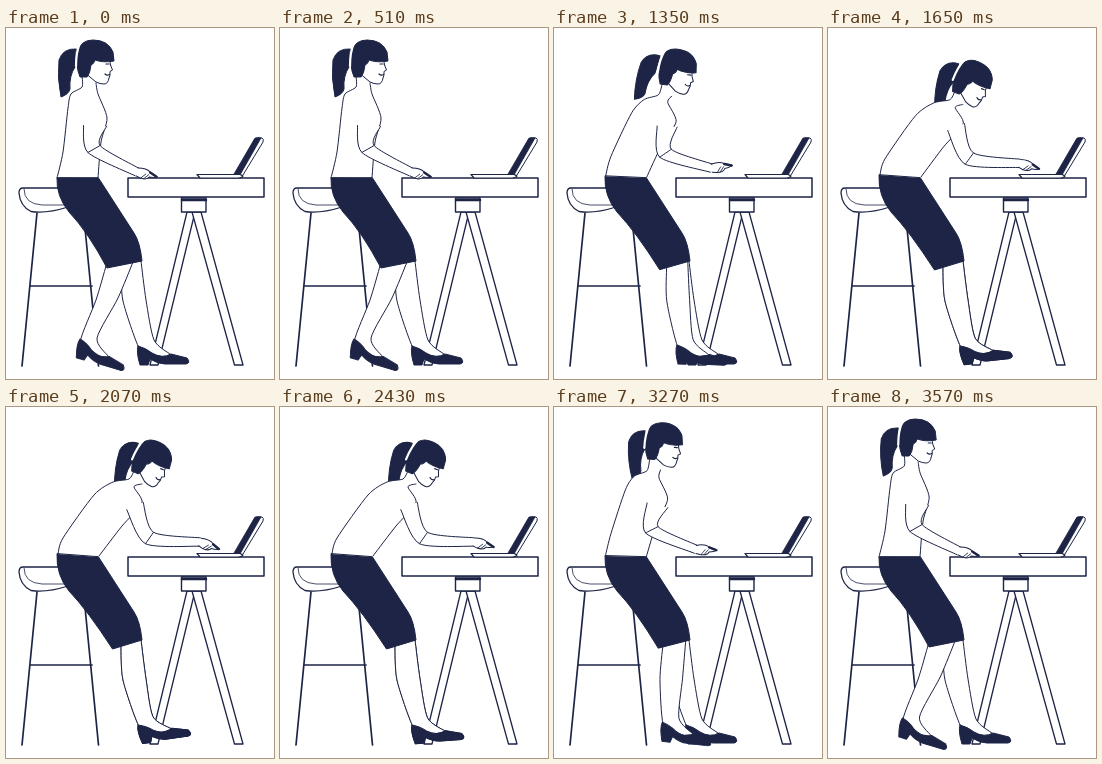
Recreate the animation shown at these times as an HTML page with a canvas. Size 268 px wide and 351 px high, loop 3600 ms.

```html
<!DOCTYPE html>
<html lang="en">
<head>
<meta charset="utf-8">
<title>Working at a high desk</title>
<style>
html, body { margin: 0; height: 100%; overflow: hidden; background: #fff; }
canvas { display: block; }
</style>
</head>
<body>
<canvas id="stage" width="268" height="351"></canvas>
<script>
const ctx = document.getElementById('stage').getContext('2d');
const NAVY = '#1d2445', LOOP = 3600;

const SHOE = new Path2D('M0 0Q-2 6 2 19H10L12 13Q20 18 27 18H48Q53 17 49 12L33 8Q24 13 14 7Q8 2 0 0Z');
const FACE = new Path2D('M-8-4L16-2Q16 3 16.5 5L18.5 10L16 11.5V15L15 18Q14 24 10 24Q6 24 2 22L-10 12Z');
const HAIR = new Path2D('M-16-9Q-13-20-1-20Q14-20 19-8L20 1Q9 3 1 0Q0 4-3 5Q-4 14-7 17H-14Q-19 5-16-9Z');
const BAND = new Path2D('M-14-17Q-18-8-18 6');
const FEATURES = new Path2D('M12 4H15M11 14Q13 16 15.5 14.5');
const TAIL = new Path2D('M2-1Q-11-2-15 10Q-17 28-13 47Q-5 44-4 39Q-5 26 1 17Z');
const HAND = new Path2D('M0-4Q8-6 13-3L21 0Q17 2 13 2Q11 6 4 5L0 4');
const FINGERS = new Path2D('M8 5L12 0M5 5L9 0');
const NAIL = new Path2D('M13-2.5L20 0');

const clamp = v => Math.max(0, Math.min(1, v));
const smooth = (t, from, to) => { const u = clamp((t - from) / (to - from)); return u * u * (3 - 2 * u); };
const mix = (a, b, k) => a + (b - a) * k;
const move = (x, y, toX, toY, k) => [mix(x, toX, k), mix(y, toY, k)];

function paint(path, fill, stroke = NAVY, width = 1) {
  if (fill) { ctx.fillStyle = fill; ctx.fill(path); }
  if (stroke) { ctx.strokeStyle = stroke; ctx.lineWidth = width; ctx.stroke(path); }
}

const shape = (d, fill, width) => paint(new Path2D(d), fill, NAVY, width);

// Smooth line through points.
function through(points, path = new Path2D(), joined = false) {
  const at = i => points[Math.max(0, Math.min(points.length - 1, i))];
  path[joined ? 'lineTo' : 'moveTo'](...points[0]);
  for (let i = 0; i < points.length - 1; i++) {
    const [a, b, c, d] = [at(i - 1), at(i), at(i + 1), at(i + 2)];
    path.bezierCurveTo(b[0] + (c[0] - a[0]) / 8, b[1] + (c[1] - a[1]) / 8,
      c[0] - (d[0] - b[0]) / 8, c[1] - (d[1] - b[1]) / 8, ...c);
  }
  return path;
}

// White area between two lines, with only the lines drawn.
function limb(left, right) {
  paint(through([...right].reverse(), through(left), true), '#fff', null);
  paint(through(left));
  paint(through(right));
}

// Line beside a chain of joints, at each joint's own distance.
function beside(joints, widths, sign) {
  return joints.map(([x, y], i) => {
    const unit = (a, b) => {
      if (!a || !b) return [0, 0];
      const length = Math.hypot(b[0] - a[0], b[1] - a[1]);
      return [(b[0] - a[0]) / length, (b[1] - a[1]) / length];
    };
    const before = unit(joints[i - 1], joints[i]), after = unit(joints[i], joints[i + 1]);
    const dx = before[0] + after[0], dy = before[1] + after[1];
    const scale = sign * widths[i] / Math.hypot(dx, dy);
    return [x - dy * scale, y + dx * scale];
  });
}

// Turns a local point into a stage point.
const locate = (x, y, angle) => (px, py) => [
  x + px * Math.cos(angle) - py * Math.sin(angle),
  y + px * Math.sin(angle) + py * Math.cos(angle)];

function placed([x, y], angle, draw) {
  ctx.save();
  ctx.translate(x, y);
  ctx.rotate(angle);
  draw();
  ctx.restore();
}

function furniture() {
  shape('M31 185L16 338M78 190L92.5 338M24 258H86', null, 1.7);
  shape('M60 160H17Q13 160 13 165Q14 178 25 183.5Q40 186 62 179', '#fff', 1.3);
  shape('M18 161Q18 176 36 177L60 177', null, .8);
  shape('M181 184L144 337H152L189 184Z', '#fff', 1.3);
  shape('M186 184L228.5 337H237L195 184Z', '#fff', 1.3);
  shape('M175.5 170H200V184H175.5Z', '#fff', 1.4);
  shape('M176 172H200', null, 2.5);
  shape('M122 150H258V169H122Z', '#fff', 1.5);
  shape('M229 147L249 111Q250 109 256 110Q258 111 257 114L237 147Z', '#fff');
  shape('M228 146L249 110H255L234 147Z', NAVY, .8);
  shape('M191 146.5H234L237 148Q236 150 232 150H194Z', '#fff', 1.2);
}

// k = 0: foot drawn back under the stool, k = 1: planted in front.
function leg(k, toeLift) {
  const heel = move(74, 311, 132, 318, k);
  const angle = .3 * (1 - k) - toeLift;
  const onFoot = locate(...heel, angle);
  limb([move(100, 238, 115, 239, k), move(90, 272, 117, 273, k), onFoot(1, 2), onFoot(14, 12)],
    [move(127, 234, 135, 233, k), move(112, 270, 140, 272, k), onFoot(16, -6), onFoot(32, 8)]);
  placed(heel, angle, () => paint(SHOE, NAVY));
}

function torso(lean, nape) {
  const back = [
    move(51, 150, 52, 147, lean), move(57, 124, 57, 131, lean), move(62, 80, 88, 88, lean),
    move(65, 66, 107, 75, lean), move(76, 59, 123, 72, lean), nape];
  const front = [
    move(90, 55, 136, 77, lean), move(92, 66, 128, 80, lean), move(101, 90, 136, 96, lean),
    move(95, 114, 116, 119, lean), move(92, 150, 93, 149, lean)];
  limb(back, front);
}

function skirt(lean, step) {
  const hem = [101 + 5.5 * step, 240 + 2 * step];
  shape(`M51 ${150 - 3 * lean}Q50 168 63 184Q82 204 ${hem}L136 233Q134 214 128 205L92.5 150Z`, NAVY);
}

function arm(lean, reach, tap) {
  const shoulder = move(89, 98, 129, 99, lean);
  const elbow = move(88, 121, 143.5, 131, reach);
  const wrist = move(131, 144, 194, 135, reach);
  const tip = move(152, 149, 214, 140, reach);
  tip[1] += 2.5 * tap - 8 * Math.sin(Math.PI * reach);

  const joints = [shoulder, elbow, wrist], widths = [11.5 - 2.5 * lean, 7, 4.2];
  const under = beside(joints, widths, 1), over = beside(joints, widths, -1);
  limb(under, over);
  paint(through([under[1], over[1]]));
  placed(wrist, Math.atan2(tip[1] - wrist[1], tip[0] - wrist[0]), () => {
    paint(HAND, '#fff');
    paint(FINGERS, null, NAVY, .8);
    paint(NAIL, null, NAVY, 2.4);
  });
}

function draw(time) {
  const t = time % LOOP;
  const returning = t > 2400;
  const lean = returning ? 1 - smooth(t, 2790, 3600) : smooth(t, 850, 1730);
  const step = 1 - (1 - lean) ** 2;
  const reach = lean ** 1.7;
  const tap = smooth(lean, .8, 1) * Math.cos((t - 2070) / 480 * 2 * Math.PI);

  const head = [mix(88, 145, lean), mix(32, 53.5, reach)];
  const tilt = .38 * lean * lean;
  const onHead = locate(...head, tilt);
  const sway = (returning ? -.5 : .5) * lean * (1 - lean) + .19 * lean;

  ctx.fillStyle = '#fff';
  ctx.fillRect(0, 0, 268, 351);
  ctx.lineJoin = ctx.lineCap = 'round';
  furniture();

  const toeLift = .07 * (tap + smooth(lean, .8, 1));
  leg(1, toeLift);
  leg(step, toeLift);

  placed(onHead(-20, -10), sway, () => paint(TAIL, NAVY));
  torso(lean, onHead(-12, 16));
  skirt(lean, step);
  placed(head, tilt, () => {
    paint(FACE, '#fff');
    paint(HAIR, NAVY);
    paint(BAND, null, '#fff', 2.2);
    paint(FEATURES, null, NAVY, 1.2);
  });
  arm(lean, reach, tap);
}

function tick(now) {
  draw(now);
  requestAnimationFrame(tick);
}
requestAnimationFrame(tick);
</script>
</body>
</html>
```
